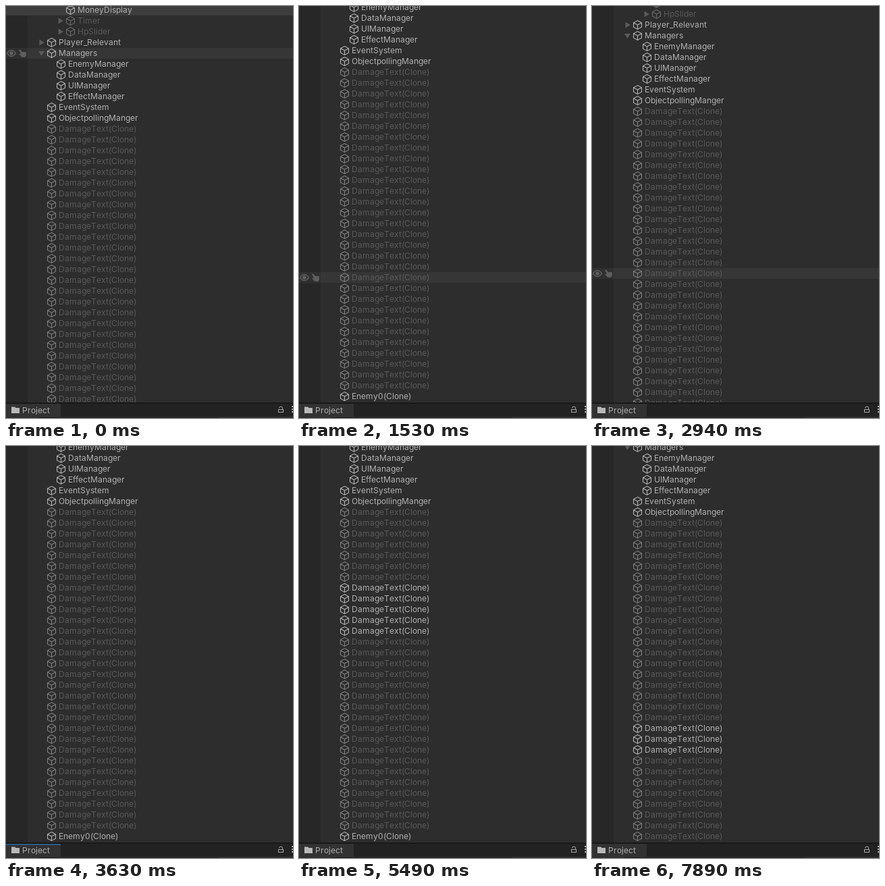
Recreate the animation shown at these times as an HTML page with a canvas. Size 425 by 610 pixels, loop 8 s.

```html
<!DOCTYPE html>
<html lang="en">
<head>
<meta charset="utf-8">
<title>Hierarchy panel</title>
<style>
  html, body { margin: 0; width: 100%; height: 100%; overflow: hidden; background: #2d2d2d; }
  canvas { display: block; }
</style>
</head>
<body>
<canvas id="stage" width="425" height="610"></canvas>
<script>
const ctx = document.getElementById('stage').getContext('2d');
const LOOP = 8000, TICK = 30, ROW = 16, WIDTH = 425, PANEL_BOTTOM = 587;
const BRIGHT = '#b0b0b0', DIM = '#595959', DIM_ICON = '#7c7c7c', ARROW = '#5a5a5a';

const tree = [
  { label: 'Sub_Canvas', indent: 0, arrow: 'down' },
  { label: 'Text_panel', indent: 1, arrow: 'down' },
  { label: 'MoneyDisplay', indent: 2 },
  { label: 'Timer', indent: 2, arrow: 'right', dim: true },
  { label: 'HpSlider', indent: 2, arrow: 'right', dim: true },
  { label: 'Player_Relevant', indent: 0, arrow: 'right' },
  { label: 'Managers', indent: 0, arrow: 'down' },
  { label: 'EnemyManager', indent: 1 },
  { label: 'DataManager', indent: 1 },
  { label: 'UIManager', indent: 1 },
  { label: 'EffectManager', indent: 1 },
  { label: 'EventSystem', indent: 0 },
  { label: 'ObjectpollingManger', indent: 0 },
];
const POOL_SIZE = 30, TEXT_LIFE = 510;
const FOCUS_START = 3630, FIGHT_START = 4290, ENEMY_DEATH = 6270;

// each burst of hits takes the next texts from the pool
const bursts = [
  { start: FIGHT_START, hits: 7, every: 115 },
  { start: 5160, hits: 5, every: 80 },
  { start: 5670, hits: 6, every: 90 },
  { start: ENEMY_DEATH, hits: 1, every: 0 },
  { start: 7770, hits: 3, every: 60 },
];
const hitTimes = bursts.flatMap(({ start, hits, every }) =>
  Array.from({ length: hits }, (_, i) => start + i * every));

// the pointer enters, rests, sweeps down and leaves
const sweeps = [
  { enter: 0, move: 90, rest: 210, leave: 240, from: 70, to: 438 },
  { enter: 930, move: 1500, rest: 1710, leave: 2010, from: 389, to: 514 },
  { enter: 2760, move: 3180, rest: 3270, leave: 3300, from: 389, to: 546 },
];

const between = (t, from, to) => t >= from && t < to;

function pointerY(t) {
  const sweep = sweeps.find(s => between(t, s.enter, s.leave));
  if (!sweep) return null;
  const ticked = Math.floor(t / TICK) * TICK;
  const progress = (ticked - sweep.move) / (sweep.rest - sweep.move);
  return sweep.from + (sweep.to - sweep.from) * Math.min(1, Math.max(0, progress));
}

// wheel notches move the list by 58 px until it reaches its lower end
function scrollTop(t) {
  const end = t < ENEMY_DEATH ? -110 : -94;
  const [base, wheelAt] = t < 2310 ? [-26, 1140] : [6, 2940];
  const notches = Math.max(0, Math.floor((t - wheelAt) / TICK) + 1);
  return Math.max(end, base - 58 * notches);
}

function rect(color, x, y, w, h) {
  ctx.fillStyle = color;
  ctx.fillRect(x, y, w, h);
}

function polygon(color, ...points) {
  ctx.fillStyle = color;
  ctx.beginPath();
  points.forEach(([x, y]) => ctx.lineTo(x, y));
  ctx.fill();
}

// whole-pixel advances without kerning, as in the editor's interface
function text(label, x, y, color) {
  ctx.fillStyle = color;
  for (const char of label) {
    ctx.fillText(char, x, y);
    x += Math.round(ctx.measureText(char).width);
  }
}

function cube(x, y, color) {
  ctx.strokeStyle = color;
  ctx.lineWidth = 1.15;
  ctx.beginPath();
  for (let side = 0; side < 6; side++) {
    const angle = side * Math.PI / 3;
    ctx.lineTo(x + 6.9 * Math.sin(angle), y - 6.4 * Math.cos(angle));
  }
  ctx.closePath();
  for (const angle of [-1, 1, 3].map(n => n * Math.PI / 3)) {
    ctx.moveTo(x, y);
    ctx.lineTo(x + 6.9 * Math.sin(angle), y - 6.4 * Math.cos(angle));
  }
  ctx.stroke();
}

function arrow(x, y, direction) {
  if (direction === 'down') polygon(ARROW, [x - 4.5, y - 3], [x + 4.5, y - 3], [x, y + 4]);
  else polygon(ARROW, [x - 3, y - 4.5], [x + 4.5, y], [x - 3, y + 4.5]);
}

function item(y, { label, indent = 0, arrow: direction }, textColor, iconColor) {
  const x = 67.5 + indent * 14;
  if (direction) arrow(x - 15, y, direction);
  cube(x, y, iconColor);
  text(label, x + 10.5, y + 4, textColor);
}

function eyeAndHand(y) {
  const color = '#5e5e5e';
  ctx.strokeStyle = color;
  ctx.lineWidth = 1.3;
  ctx.beginPath();
  ctx.moveTo(1.5, y);
  ctx.quadraticCurveTo(8, y - 9, 14.5, y);
  ctx.quadraticCurveTo(8, y + 9, 1.5, y);
  ctx.stroke();
  ctx.fillStyle = color;
  ctx.beginPath();
  ctx.arc(8, y, 2.8, 0, Math.PI * 2);
  ctx.fill();
  polygon(color, [19, y - 5], [21, y - 5.5], [24, y - 2], [29.5, y - 2], [30, y + 3],
    [28, y + 6], [23, y + 5.5], [19, y + 1], [22, y + 0.5]);
}

function drawTree(t) {
  const top = scrollTop(t);
  const pointer = pointerY(t);

  rect('#2d2d2d', 0, 0, WIDTH, PANEL_BOTTOM);
  rect('#272727', 0, 0, 32, PANEL_BOTTOM);
  if (between(t, 0, 1140) || between(t, 2310, 2940)) rect('#3d3d3d', 0, 0, WIDTH, 14);

  if (pointer !== null) {
    const y = top + ROW * Math.round((pointer - top) / ROW);
    rect('rgba(255,255,255,0.045)', 0, y - 8, WIDTH, ROW);
    eyeAndHand(y);
  }

  tree.forEach((entry, i) =>
    item(top + i * ROW, entry, entry.dim ? DIM : BRIGHT, entry.dim ? '#686868' : BRIGHT));

  const poolTop = top + tree.length * ROW;
  for (let i = 0; i < POOL_SIZE; i++) {
    const lit = between(t, hitTimes[i], hitTimes[i] + TEXT_LIFE);
    item(poolTop + i * ROW, { label: 'DamageText(Clone)' },
      lit ? BRIGHT : DIM, lit ? BRIGHT : DIM_ICON);
  }
  if (t < ENEMY_DEATH) item(poolTop + POOL_SIZE * ROW, { label: 'Enemy0(Clone)' }, BRIGHT, BRIGHT);
}

function drawTabBar(t) {
  rect('#191919', 0, PANEL_BOTTOM, WIDTH, 2);
  rect('#222222', 0, 589, WIDTH, 19);
  rect('#323232', 0, 589, 81, 19);
  if (between(t, FOCUS_START, FIGHT_START)) rect('#2c5d87', 0, 589, 81, 2);
  rect('#303030', 0, 608, WIDTH, 2);
  rect('#1c1c1c', 48, 609, 268, 1);

  polygon('#b8b8b8', [8, 593.5], [13, 593.5], [14.5, 595], [20, 595], [20, 603], [8, 603]);
  text('Project', 24, 603, BRIGHT);

  ctx.strokeStyle = '#a8a8a8';
  ctx.lineWidth = 1;
  ctx.strokeRect(403.5, 597.5, 7, 4);
  ctx.beginPath();
  ctx.moveTo(409.5, 597);
  ctx.lineTo(409.5, 595.5);
  ctx.arc(407, 595.5, 2.5, 0, Math.PI, true);
  ctx.stroke();
  for (const y of [592, 596, 600]) rect('#a8a8a8', 423, y, 2, 2);
}

const start = performance.now();

function frame() {
  const t = (performance.now() - start) % LOOP;
  ctx.font = '12px Inter, sans-serif';
  drawTree(t);
  drawTabBar(t);
  requestAnimationFrame(frame);
}

frame();
</script>
</body>
</html>
```
